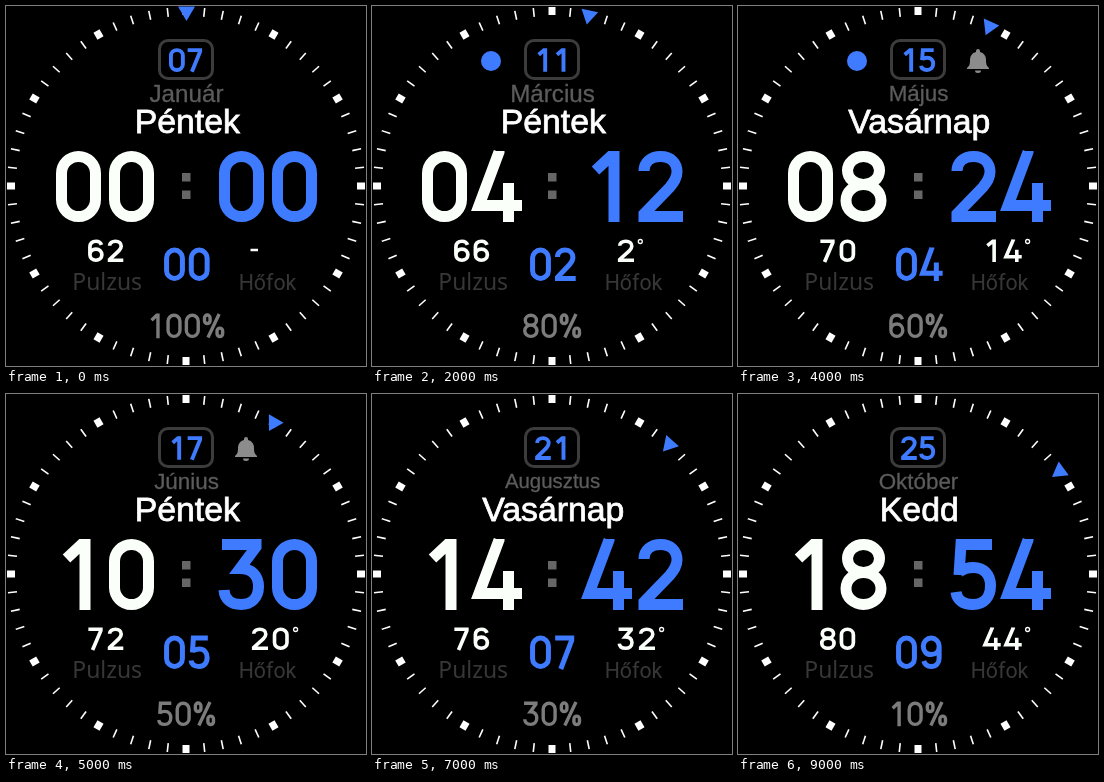
Animation of 360 by 360 pixels, one loop 10000 ms. Source, as an HTML page:

```html
<!DOCTYPE html>
<html lang="hu">
<head>
<meta charset="utf-8">
<title>Óralap</title>
<style>
  html, body { margin: 0; width: 100%; height: 100%; overflow: hidden; background: #000; }
  svg { display: block; width: 360px; height: 360px; }
  text { text-anchor: middle; }
  .digits path { fill: none; stroke-miterlimit: 8; vector-effect: non-scaling-stroke; }
  #month { font-family: "Liberation Sans", Arial, sans-serif; fill: #5c5c5c; stroke: #5c5c5c; stroke-width: .3; }
  #weekday { font: 33.8px "Liberation Sans", Arial, sans-serif; fill: #fff; stroke: #fff; stroke-width: .8; }
  #pulseLabel { font: 22.9px "Noto Sans", sans-serif; fill: #373737; }
  #tempLabel { font: 21.3px Roboto, sans-serif; fill: #373737; }
</style>
</head>
<body>
<svg viewBox="0 0 360 360">
  <rect width="360" height="360"/>
  <g id="ticks" fill="#fff"></g>
  <path id="marker" d="M172 .5h17l-8.500 14.500z" fill="#3f7bff"/>
  <rect x="153.500" y="34.500" width="53" height="38" rx="8.500" fill="none" stroke="#3c3c3c" stroke-width="3"/>
  <circle id="link" cx="119" cy="55" r="10" fill="#3f7bff"/>
  <path id="bell" fill="#8c8c8c" d="M240 43a2 2 0 0 1 2 2v1c4 1 6 4 6 8 0 5 1 6 3 8v1h-22v-1c2-2 3-3 3-8 0-4 2-7 6-8v-1a2 2 0 0 1 2-2zM237 64.500h6a3 2.500 0 0 1-6 0z"/>
  <text id="month" x="180.500"></text>
  <text id="weekday" x="181.300" y="126.600"></text>
  <path d="M176 167h8.500v8.500h-8.500zM176 184.500h8.500v8.500h-8.500z" fill="#666"/>
  <text id="pulseLabel" x="101.200" y="284">Pulzus</text>
  <text id="tempLabel" x="261.500" y="284">Hőfok</text>
  <g id="readings"></g>
</svg>
<script>
const STEP = 1000, STEPS = 10;
const BLUE = '#3f7bff', WHITE = '#fafffa', GREY = '#7c7c7c';
const months = ['Január', 'Február', 'Március', 'Április', 'Május', 'Június', 'Július', 'Augusztus', 'Szeptember', 'Október'];
const monthSizes = [24.2, 24.2, 24.2, 22.4, 22.4, 22.4, 22.4, 20.4, 20.4, 22.4];
const weekdays = ['Vasárnap', 'Hétfő', 'Kedd', 'Szerda', 'Csütörtök', 'Péntek', 'Szombat'];
const $ = id => document.getElementById(id);

// Numeral centre lines in a 45 x 71 cell.
const six = 'M38.5 17C36 9.500 31 5.500 23 5.500C11 5.500 5.500 13 5.500 23V48.500a17 17 0 0 0 34 0C39.500 38 33 30.500 22.500 30.500C13 30.500 5.500 37 5.500 47';
const glyphs = {
  0: 'M5.5 22.500a17 17 0 0 1 34 0v26a17 17 0 0 1-34 0z',
  1: 'M10.5 19.500L25.500 5.500H29V71',
  2: 'M6 20C6 11 13 5.500 22.500 5.500C33 5.500 39 12 39 21C39 27 36 31 32 36L6 63V65.500H45',
  3: 'M3 5.500H37V8L21 29.500C33 29.500 39.500 37 39.500 47.500C39.500 59 32 65.500 22 65.500C12 65.500 5.500 60 5 51',
  4: 'M24 0V1L4 54.500H47M33.500 32V71',
  5: 'M41 5.500H10L8 36M8 33C12 30 17 28.500 22.500 28.500C33 28.500 39.500 36 39.500 46.500C39.500 58 33 65.500 22 65.500C12 65.500 6 61 5 53',
  6: six,
  7: 'M1 5.500H36.500V10L13 71',
  8: 'M22.5 5.500a16 14 0 0 1 0 28a16 14 0 0 1 0-28M22.5 33.500a17.500 16 0 0 1 0 32a17.500 16 0 0 1 0-32',
  9: six,
  '%': 'M13 5a8 8 0 0 1 8 8v8a8 8 0 0 1-16 0v-8a8 8 0 0 1 8-8M49 42a8 8 0 0 1 8 8v8a8 8 0 0 1-16 0v-8a8 8 0 0 1 8-8M47 2L15 69'
};

function digits(value, x, y, w, h, advance, weight, color) {
  const paths = [...value].map((char, i) => {
    const turn = char === '9' ? ' rotate(180 22.5 35.5)' : '';
    return `<path d="${glyphs[char]}" transform="translate(${x + i * advance} ${y}) scale(${w / 45} ${h / 71})${turn}"/>`;
  });
  return `<g class="digits" role="img" aria-label="${value}" stroke="${color}" stroke-width="${weight}">${paths.join('')}</g>`;
}

function temperature(degrees) {
  if (degrees < 0) return `<path d="M244.5 244h7.500" stroke="${WHITE}" stroke-width="2.500"/>`;
  const value = String(degrees);
  return digits(value, 245.5, 233.5, 16.5, 22.5, 21, 3.6, WHITE) +
    `<circle cx="${247 + value.length * 21.3}" cy="235.500" r="2" fill="none" stroke="${WHITE}" stroke-width="1.300"/>`;
}

function draw(step) {
  const pad = n => String(n).padStart(2, '0');
  const day = 7 + 2 * step;
  const battery = `${100 - 10 * step}%`;
  const show = (id, on) => $(id).setAttribute('visibility', on ? 'visible' : 'hidden');

  $('marker').setAttribute('transform', `rotate(${6 * step} 180.5 180)`);
  show('link', step >= 1 && step <= 4);
  show('bell', step >= 3 && step <= 6);
  $('month').textContent = months[step];
  $('month').style.fontSize = monthSizes[step] + 'px';
  $('month').setAttribute('y', 84 + monthSizes[step] / 2);
  $('weekday').textContent = weekdays[new Date(2022, step, day).getDay()];
  $('readings').innerHTML =
    digits(pad(day), 163, 42.3, 15.8, 23.5, 18.3, 3.9, BLUE) +
    digits(pad(2 * step), 50, 145, 45, 71, 53, 11, WHITE) +
    digits(pad(6 * step), 213, 145, 45, 71, 53, 11, BLUE) +
    digits(pad(step), 158, 241.5, 21, 33.5, 24.7, 5, BLUE) +
    digits(String(62 + 2 * step), 82, 233.5, 15.8, 22.5, 19.5, 3.7, WHITE) +
    digits(battery, 180.3 - (18.3 * (battery.length - 1) + 22) / 2, 307.3, 15.7, 25, 18.3, 3.4, GREY) +
    temperature(6 * step - 10);
}

$('ticks').innerHTML = Array.from({ length: 60 }, (_, i) => {
  const [w, h] = i % 5 ? [1.6, 9] : [7, 8];
  return `<rect x="${180 - w / 2}" y="1" width="${w}" height="${h}" transform="rotate(${i * 6} 180 180)"/>`;
}).join('');

const start = performance.now();
let shown = -1;
function tick() {
  const step = Math.floor((performance.now() - start) / STEP) % STEPS;
  if (step !== shown) draw(shown = step);
  requestAnimationFrame(tick);
}
tick();
</script>
</body>
</html>
```
